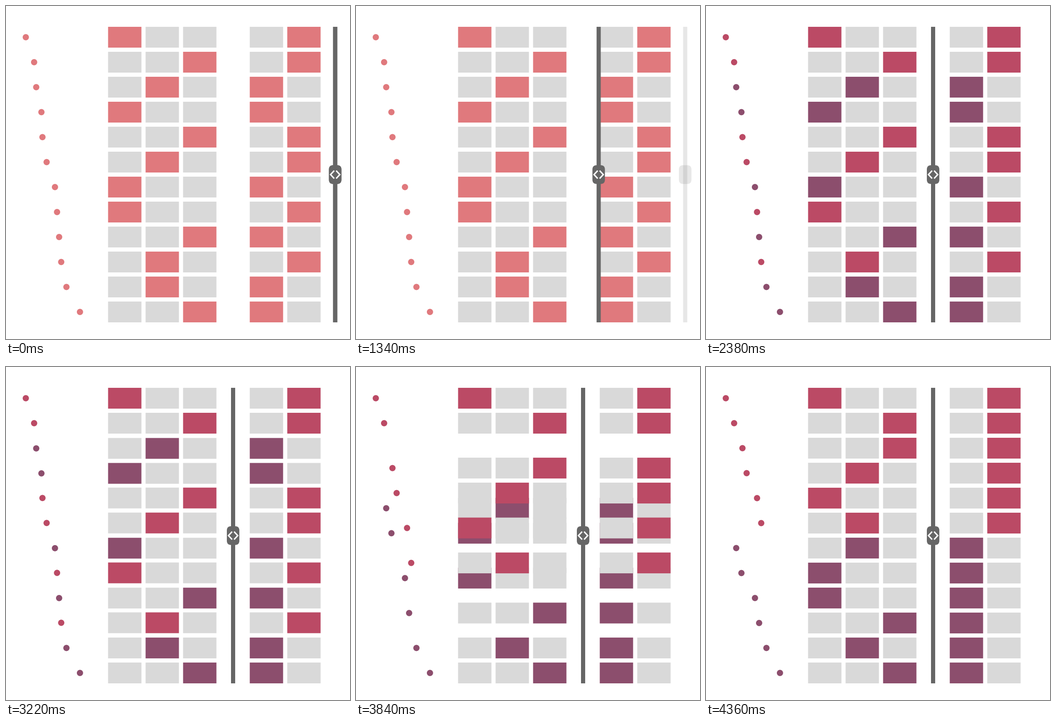
A matplotlib script for the animation above (5.18 s loop, 743 by 720 pixels).

```python
import matplotlib.pyplot as plt
import numpy as np
from matplotlib.animation import FuncAnimation
from matplotlib.colors import to_rgb
from matplotlib.lines import Line2D
from matplotlib.patches import Circle, FancyBboxPatch, Rectangle
from matplotlib.transforms import Affine2D

WIDTH, HEIGHT, DPI = 743, 720, 64
STEP_MS, LOOP_MS = 20, 5180
UNIT = 2.25  # layout grid in pixels
TOP, PITCH, CELL_W, CELL_H = 45, 54, 72, 45
FEATURE_X = (220.5, 301.5, 382.5)
LABEL_X = (526.5, 607.5)
BAR_START, BAR_END, BAR_MID = 711, 490.5, 364.5

CORAL, CRIMSON, PURPLE = (np.array(to_rgb(c)) for c in ("#e0797d", "#bb4a65", "#8c4e6d"))
GRAY, DARK = "#d9d9d9", "#666666"

# (dot position in grid units, feature column, label column)
ROWS = [(19, 0, 1), (27, 2, 1), (29, 1, 0), (34, 0, 0), (35, 2, 1), (39, 1, 1),
        (47, 0, 0), (49, 0, 1), (51, 2, 0), (53, 1, 1), (58, 1, 0), (71, 2, 0)]
SORTED = sorted(range(len(ROWS)), key=lambda i: ROWS[i][2] == 0)

S = np.linspace(0, 1, 1001)
EASE_X = 1.26 * S * (1 - S) ** 2 + 1.74 * S ** 2 * (1 - S) + S ** 3
EASE_Y = 3 * S ** 2 - 2 * S ** 3


def ease(t, start, end):
    """Cubic-bezier ease-in-out between two times."""
    return np.interp((t - start) / (end - start), EASE_X, EASE_Y)


fig = plt.figure(figsize=(WIDTH / DPI, HEIGHT / DPI), dpi=DPI, facecolor="white")
ax = fig.add_axes([0, 0, 1, 1])
ax.set(xlim=(0, WIDTH), ylim=(HEIGHT, 0))
ax.axis("off")


def place(artist, move):
    artist.set_snap(False)
    artist.set_transform(move + ax.transData)
    ax.add_artist(artist)
    return artist


class Row:
    def __init__(self, index, dot, feature, label):
        self.move = Affine2D()
        self.final = CRIMSON if label else PURPLE
        self.shift = (SORTED.index(index) - index) * PITCH
        self.colored = []
        y, z = TOP + PITCH * index, 2 if label else 1
        for columns, active in ((FEATURE_X, feature), (LABEL_X, label)):
            for i, x in enumerate(columns):
                cell = place(Rectangle((x, y), CELL_W, CELL_H, fc=GRAY, lw=0, zorder=z), self.move)
                if i == active:
                    self.colored.append(cell)
        circle = Circle((dot * UNIT, y + CELL_H / 2), 3 * UNIT, lw=0, zorder=z)
        self.colored.append(place(circle, self.move))

    def update(self, fade, sort):
        self.move.clear().translate(0, self.shift * sort)
        for patch in self.colored:
            patch.set_facecolor(CORAL + (self.final - CORAL) * fade)


def make_slider(move, z):
    bar = Rectangle((-4.5, TOP), 9, 639, fc=DARK, lw=0, zorder=z)
    handle = FancyBboxPatch((-13.5, BAR_MID - 20.25), 27, 40.5, fc=DARK, lw=0, zorder=z,
                            boxstyle="round,pad=0,rounding_size=9")
    return [place(bar, move), place(handle, move)]


rows = [Row(i, *row) for i, row in enumerate(ROWS)]
ghost = make_slider(Affine2D().translate(BAR_START, 0), 3)
slider_move = Affine2D()
make_slider(slider_move, 4)
for side in (-1, 1):
    chevron = Line2D([2.1 * side, 10 * side, 2.1 * side],
                     [BAR_MID - 8.5, BAR_MID, BAR_MID + 8.5], color="white",
                     lw=3 * 72 / DPI, solid_capstyle="butt", solid_joinstyle="miter", zorder=5)
    place(chevron, slider_move)


def update(frame):
    t = frame * STEP_MS
    slide = ease(t, 480, 1660)
    slider_move.clear().translate(BAR_START + (BAR_END - BAR_START) * slide, 0)
    for patch in ghost:
        patch.set_alpha(1 - slide)
    fade, sort = ease(t, 1920, 2320), ease(t, 3180, 4360)
    for row in rows:
        row.update(fade, sort)
    return []


anim = FuncAnimation(fig, update, frames=LOOP_MS // STEP_MS, interval=STEP_MS,
                     repeat=True, repeat_delay=0, blit=False)
plt.show()
```
